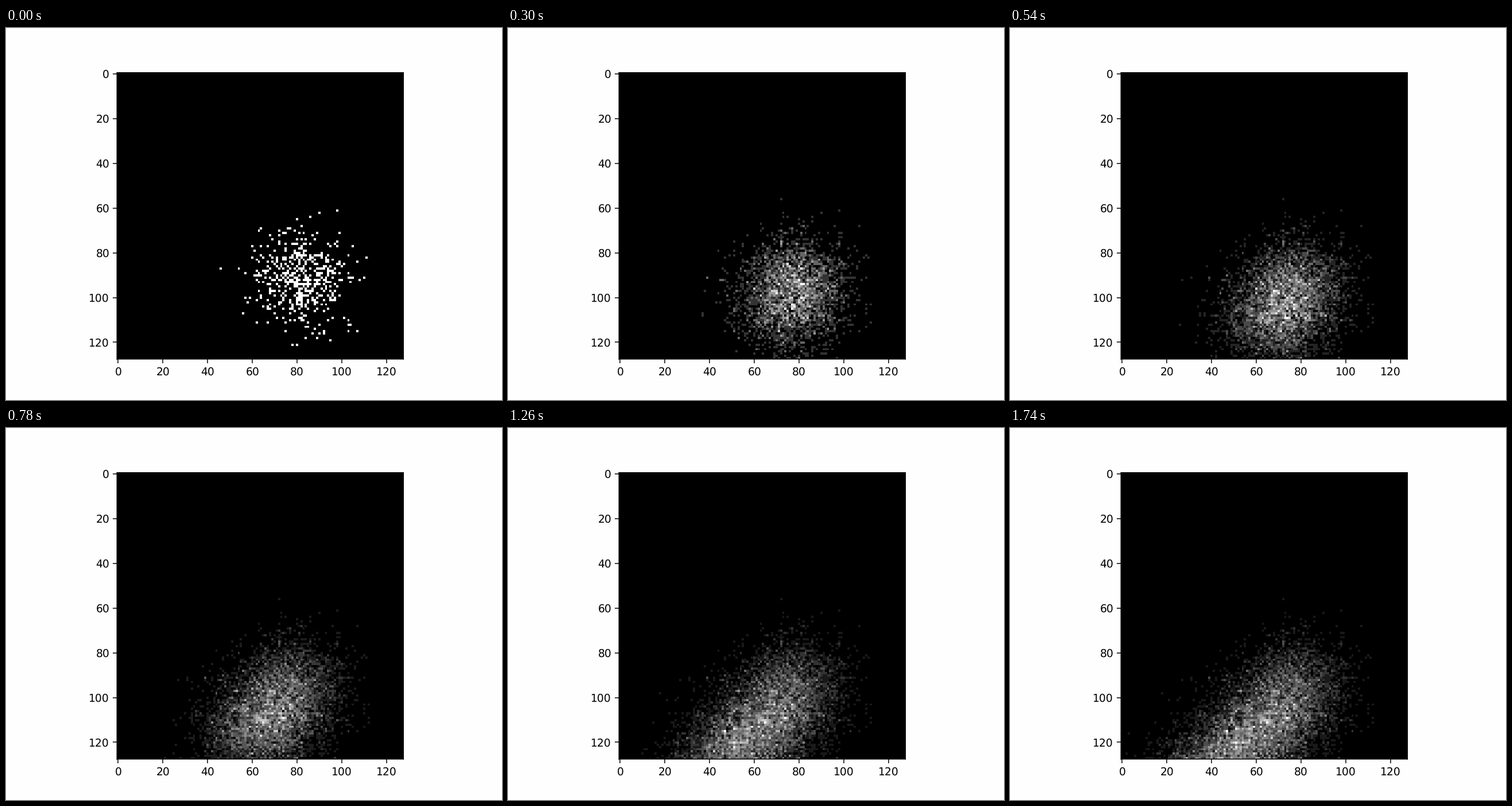
These frames come from a looping animation (864 px wide and 648 px high, 1800 ms). A matplotlib script:

```python
import numpy as np
import matplotlib.pyplot as plt
from matplotlib.animation import FuncAnimation

SIZE = 128
FRAMES = 30
HITS = 500
SIGMA = 11.2
START = np.array([82.0, 93.0])
VELOCITY = np.array([-2.0, 2.1])


def burst(rng, step):
    """Cells struck by the drifting beam in one step, each at most once."""
    center = START + VELOCITY * step
    cells = np.rint(rng.normal(center, SIGMA, (HITS, 2))).astype(int)
    x, y = cells[((cells >= 0) & (cells < SIZE)).all(axis=1)].T
    hit = np.zeros((SIZE, SIZE))
    hit[y, x] = 1
    return hit


rng = np.random.default_rng(7)
exposures = np.cumsum([burst(rng, k) for k in range(FRAMES)], axis=0)

plt.rcParams["text.hinting"] = "none"
fig, ax = plt.subplots(figsize=(6.4, 4.8), dpi=135, facecolor="#fefefe")
image = ax.imshow(exposures[0], cmap="gray", vmin=0, vmax=1)

# Keep the thin lines at their exact subpixel positions.
for line in [*ax.spines.values(), *ax.get_xticklines(), *ax.get_yticklines()]:
    line.set_snap(False)


def update(k):
    image.set_data(exposures[k])
    image.set_clim(0, exposures[k].max())
    return [image]


anim = FuncAnimation(fig, update, frames=FRAMES, interval=60,
                     repeat=True, repeat_delay=0)
plt.show()
```
